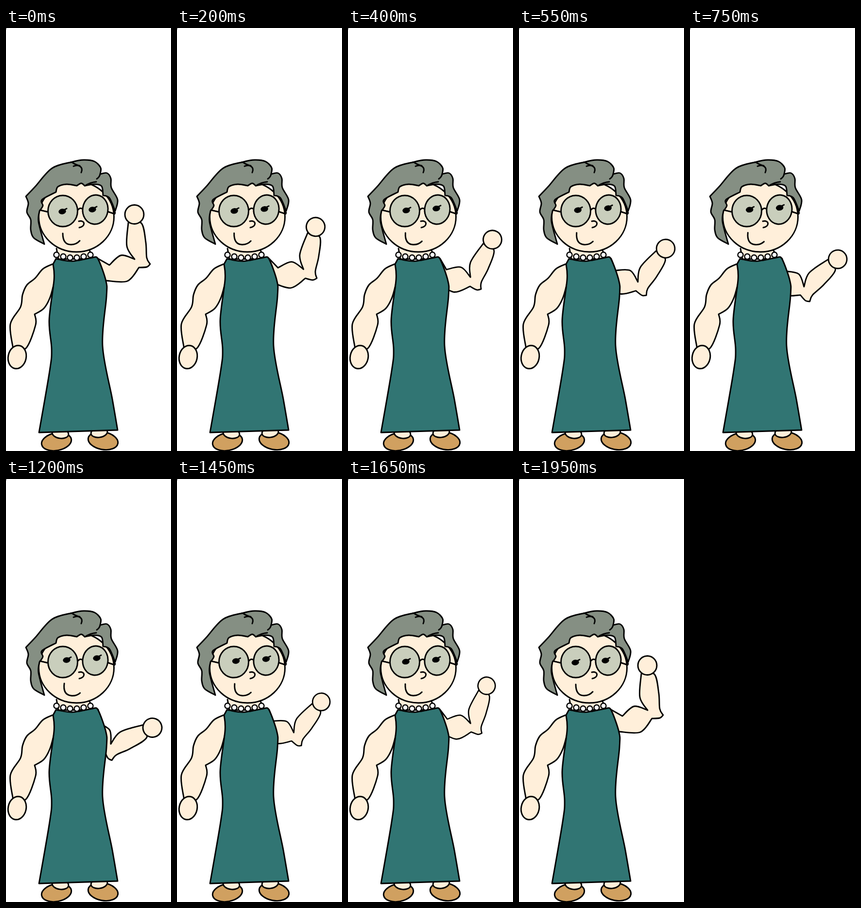
These frames come from a looping animation (340 by 869 pixels, 2 s). An HTML page:

```html
<!DOCTYPE html>
<html lang="en">
<head>
<meta charset="utf-8">
<title>Flexing arm</title>
<style>
  html, body { margin: 0; width: 100%; height: 100%; overflow: hidden; background: #fff; }
  svg { display: block; fill: none; stroke: #000; stroke-width: 2.9; stroke-linecap: round; stroke-linejoin: round; }
  .skin { fill: #ffefda; }
  .hair { fill: #858f83; }
  .lens { fill: #c9cebc; }
  .dress { fill: #317573; }
  .shoe { fill: #d0a060; }
  .bead { fill: #fff; stroke-width: 2.4; }
  .ink { fill: #000; stroke-width: 1.5; }
</style>
</head>
<body>
<svg id="stage" width="340" height="869" viewBox="0 0 340 869"></svg>
<script>
const stage = document.getElementById('stage');

function add(parent, tag, cls, attrs = {}) {
  const el = document.createElementNS('http://www.w3.org/2000/svg', tag);
  if (cls) el.setAttribute('class', cls);
  for (const k in attrs) el.setAttribute(k, attrs[k]);
  return parent.appendChild(el);
}
const group = () => add(stage, 'g');
const path = (cls, d, parent = stage) => add(parent, 'path', cls, { d });
const oval = (cls, cx, cy, rx, ry, turn = 0, parent = stage) =>
  add(parent, 'ellipse', cls, { cx, cy, rx, ry, transform: `rotate(${turn} ${cx} ${cy})` });

// Smooth curve through key points; "|" after a point makes it a sharp corner.
function line(text) {
  const runs = text.split('|').map(run => run.trim().split(/\s+/).map(q => q.split(',').map(Number)));
  let d = `M${runs[0][0]}`;
  runs.forEach((run, r) => {
    const p = r ? [runs[r - 1].at(-1), ...run] : run;
    for (let i = 0; i < p.length - 1; i++) {
      const b = p[i], c = p[i + 1], a = p[i - 1] || b, e = p[i + 2] || c;
      const h = b.map((v, k) => v + (c[k] - a[k]) / 6);
      const g = c.map((v, k) => v - (e[k] - b[k]) / 6);
      d += `C${h} ${g} ${c}`;
    }
  });
  return d;
}

// Feet, mirrored
function foot(x, y, side) {
  oval('shoe', x, y, 31, 18, -10 * side);
  oval('skin', x + 8 * side, y - 17, 17, 10, 8 * side);
}
foot(104, 850, 1);
foot(200, 848, -1);

// Resting arm
path('skin', line('96,485 76,495 60,514 43,528 34,548 30,573 9,608 14,655|41,658 61,610 59,588|78,576 91,553 100,520'));
oval('skin', 23, 676, 18.5, 24, 12);

// Flexing arm, turned as a whole about the shoulder
const shoulder = [190, 474];
const arm = group();
path('skin', line(`${shoulder} 213,487|237,467 265,475|249,448 252,400|
  279,401 288,440 290,472 297,485|290,491 274,492|250,520 206,519`), arm);
oval('skin', 264.5, 383, 19.5, 19.5, 0, arm);

// Neck, dress and beads
path('skin', 'M104,453L108,475L180,474L169,450');
path('dress', line('97,485 103,474|137,479 181,471|190,475 206,520 207,552 199,653 219,762 230,826|68,831|90,704 94,660 89,600 99,517 97,485'));
for (let i = 0; i < 6; i++) oval('bead', 104 + 14 * i, 466 + 6 * Math.sin(Math.PI * i / 5), 5.5, 5.5);

// Head
oval('skin', 145, 388, 77.5, 72);
path('hair', line(`79,444 67,398 69,376|76,365 74,353 103,337|107,326 125,321 146,324|155,319 162,324|
  182,321 197,325 200,344|213,349 225,376|230,353 217,328 216,309 208,298 194,300|
  195,287 182,274 160,271 137,275 95,288 60,326 41,346|46,360 43,378 51,394 51,415 57,431 79,444`));
path('', 'M136,276C142,280 147,282 152,283M139,284C150,279 160,286 155,297');
path('', 'M163,324Q174,317 186,316M194,300Q193,306 187,310');

// Glasses and nose
path('', 'M70,374L87,378M148,374Q153,367 159,373M209,377L224,382M221,372L225,380');
oval('lens', 117, 376, 30.5, 32);
oval('lens', 184, 373, 26, 30, 8);
path('', 'M150,397C164,394 164,408 151,410');

// Moving face parts
const eyes = group();
for (const [x, y] of [[116, 377], [178, 373]]) {
  oval('ink', x, y, 7, 5, -8, eyes);
  path('', `M${x + 3},${y - 3}l6,-3`, eyes);
}
const mouth = path('', 'M117,422Q117,445 134,445Q145,445 152,437');
path('ink', 'M0,1v1');

const ease = (u, k) => u * (1 + k - k * u);

function draw(now) {
  const t = Math.floor(now % 2000 / 50) * 50;
  const down = t < 1200;
  const u = down ? t / 1200 : (t - 1200) / 750;
  const open = down ? ease(u, 0.5) : 1 - ease(u, 0.25);
  const size = 1 - (down ? 0.03 : 0.09) * Math.sin(Math.PI * u);

  const [x, y] = shoulder;
  arm.setAttribute('transform', `translate(${x} ${y}) rotate(${69 * open}) scale(${size}) translate(${-x} ${-y})`);
  eyes.setAttribute('transform', `translate(${9 * open} ${-5 * open})`);
  mouth.setAttribute('transform', `rotate(${8 * open} 134 443)`);
}

const start = performance.now();
function tick() {
  draw(performance.now() - start);
  requestAnimationFrame(tick);
}
tick();
</script>
</body>
</html>
```
